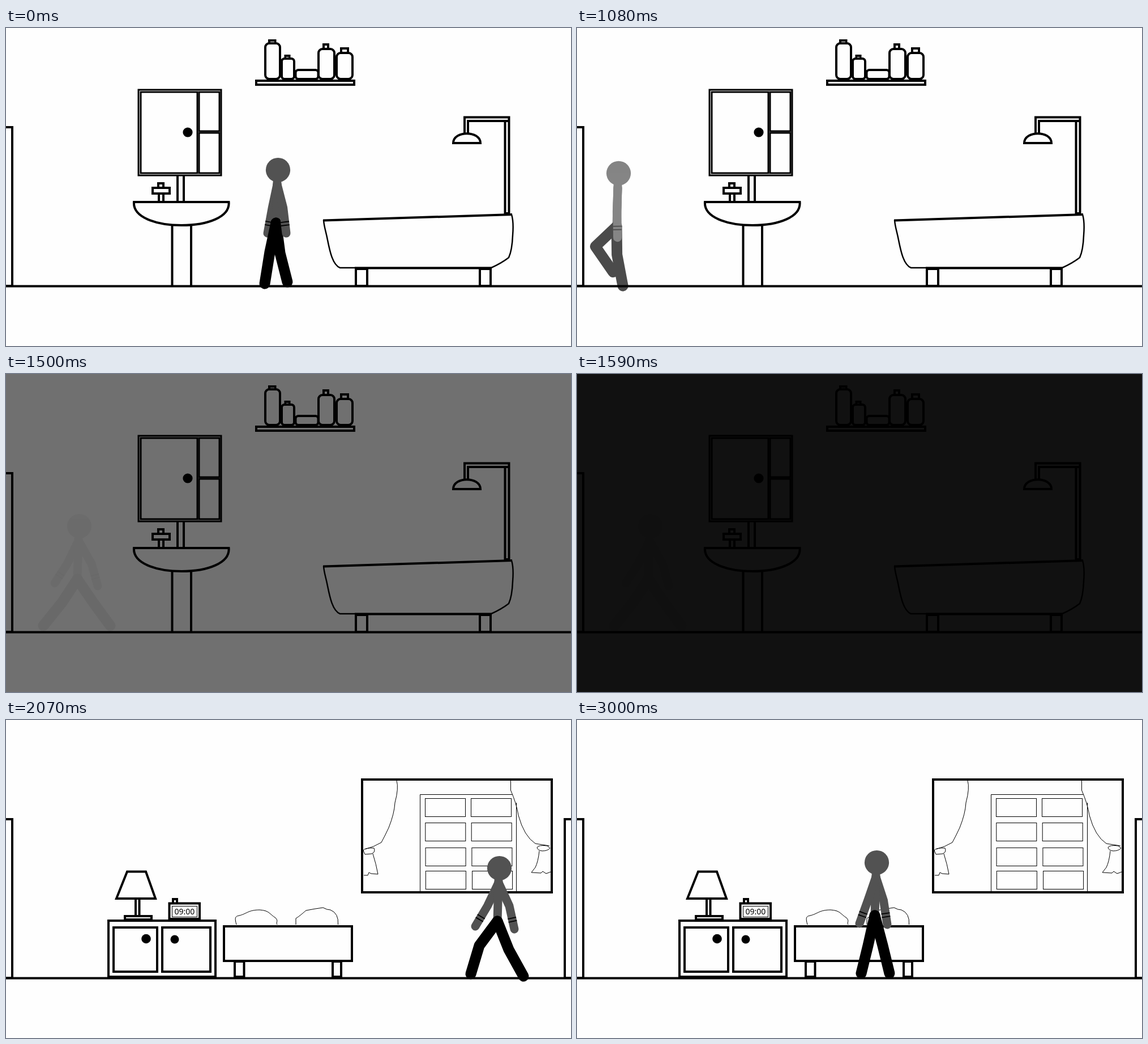
An HTML page for the animation above (3300 ms loop, 998x561 px).

```html
<!DOCTYPE html>
<html lang="en">
<head>
<meta charset="utf-8">
<title>Bedtime walk</title>
<style>
html, body { margin: 0; width: 100%; height: 100%; overflow: hidden; background: #fefefe; }
svg { display: block; width: 998px; height: 561px; }
.line { fill: none; stroke: #000; stroke-width: 4; }
.mid { stroke-width: 3; }
.thin { stroke-width: 1; }
.dot { fill: #000; stroke: none; }
#walker { fill: none; stroke-linecap: round; stroke-linejoin: round; }
.skin { stroke: #525252; stroke-width: 15; }
.leg { stroke: #000; stroke-width: 19; }
.band { stroke: #000; stroke-width: 1.8; stroke-linecap: butt; }
text { font: 14px "Noto Sans", "Open Sans", sans-serif; text-anchor: middle; }
</style>
</head>
<body>
<svg viewBox="0 0 998 561">
  <path class="line" d="M0 455.5H998"/>

  <g id="bathroom" class="line">
    <g class="mid">
      <rect x="234" y="109" width="146" height="151"/>
      <rect x="238" y="113" width="100" height="143"/>
      <rect x="341" y="113" width="36" height="69"/>
      <rect x="341" y="185" width="36" height="71"/>
    </g>
    <circle class="dot" cx="321" cy="184" r="8.6"/>
    <path d="M303 260V307M314 260V307"/>
    <path d="M259 282H289V292H259ZM269 282V274H278V282M270 292V307M278 292V307"/>
    <path d="M226 307H393.500C396 334 355 348 310 348S224 334 226 307Z"/>
    <path d="M293.500 348V455M327 348V455"/>

    <rect x="442" y="93" width="173" height="7"/>
    <rect x="458" y="27" width="26" height="63" rx="7"/>
    <rect x="465" y="22" width="10.500" height="5"/>
    <rect x="487" y="54" width="22" height="36" rx="5"/>
    <rect x="493.500" y="49" width="7" height="5"/>
    <rect x="511.500" y="74" width="40" height="16" rx="5"/>
    <rect x="552" y="37" width="28" height="53" rx="7"/>
    <rect x="561" y="29" width="8" height="8"/>
    <rect x="584" y="44" width="28" height="46" rx="7"/>
    <rect x="592" y="36" width="12" height="8"/>

    <path d="M881.500 164V327H888.500V157.500H810V185M816 185V164H889"/>
    <path d="M790 203C790 180.500 838 180.500 838 203Z"/>

    <path d="M560 339.500L894 329M616 423.500H858"/>
    <path stroke-width="2.500" d="M561 339C562 352 565 358 568 374C572 394 577 418 590 423H857Q875 415 888 405Q894 392 895 366Q897 342 893 329"/>
    <path d="M618 425H638V455H618ZM837 425H856V455H837Z"/>
  </g>

  <g id="bedroom" class="line">
    <rect x="181" y="354" width="189" height="99"/>
    <rect x="190" y="366" width="77" height="78"/>
    <rect x="276" y="366" width="85" height="78"/>
    <circle class="dot" cx="247.500" cy="386" r="8.300"/>
    <circle class="dot" cx="298" cy="387" r="7.500"/>
    <path d="M214 267.500H247L264 315H195ZM229 316V345M235.500 316V345M210 346H257V352H210Z"/>
    <path d="M288.500 323.500H342V351H288.500ZM295 323V316H302V323"/>
    <rect class="thin" x="293.500" y="328.500" width="44" height="19"/>
    <text x="315.500" y="343" fill="#000" stroke="none">09:00</text>

    <rect x="385" y="364" width="226" height="61"/>
    <path d="M404 426H420.500V453H404ZM577 426H592V453H577Z"/>
    <g class="thin">
      <path d="M407 361C404 350 404 346 412 345C425 342 428 335 448 335C465 336 465 342 476 349C482 355 476 357 479 361"/>
      <path d="M512 361V350C520 345 525 340 530 336Q545 333 560 331Q567 335 573 335Q588 341 586.500 361"/>
      <path d="M731.500 302V131.500H895M901.500 146V302"/>
      <g id="panes"></g>
      <path d="M690 107Q694 120 687 146Q686 165 676 190Q670 203 663 216Q650 224 634 228"/>
      <path d="M631 230Q634 225 650 226Q653 233 646 236L634 237ZM648 236Q654 255 657 272L645 271L641 269L639 274H632"/>
      <path d="M891.500 107V124Q902 148 905 168Q915 205 935 218L960 222"/>
      <path d="M938 225Q940 220 956 222L961 226Q957 231 947 231Q939 230 938 225ZM942 231Q940 250 935 260L928 269L945 270L948 267L954 271L962 268"/>
    </g>
    <rect x="629" y="105" width="335" height="199"/>
  </g>

  <g id="walker">
    <path class="skin"/><path class="band"/>
    <path class="skin"/>
    <path class="leg"/><path class="leg"/>
    <path class="skin"/><path class="band"/>
    <circle r="21.600" fill="#525252"/>
  </g>

  <g class="line" style="fill:#fefefe">
    <path d="M-5 175H11V455H-5"/>
    <path id="exit" d="M1003 175H987V455H1003"/>
  </g>
  <rect id="shade" width="998" height="561"/>
</svg>
<script>
const $ = id => document.getElementById(id);
const clamp = v => Math.max(0, Math.min(1, v));
const mix = (a, b, k) => a.map((v, i) => v + (b[i] - v) * k);
const parts = $('walker').children;

$('panes').innerHTML = [139, 182, 226, 267].map((y, i) =>
  [740.5, 821.5].map((x, j) =>
    `<rect x="${x + (j ? i * .7 : i * .3)}" y="${y - .5}" width="71" height="32"/>`).join('')).join('');

// Pose: hip height, then knee, foot, knee, foot, hand, hand relative to the hip
const contact = [355, -32, 43, -47, 93, 20, 50, 46, 97, -39, 9, 30, 14];
const rest = [345, -12, 53, -24, 102, 14, 53, 26, 102, -27, 14, 22, 16];
const wide = [362, -27, 41, -60, 82, 28, 41, 58, 82, -40, 7, 36, 12];
const swap = p => [p[0], ...p.slice(5, 9), ...p.slice(1, 5), p[11], p[12], p[9], p[10]];
const step = [
  [0, contact],
  [.28, [344, -11, 51, -20, 107, 7, 53, 20, 104, -15, 18, 18, 18]],
  [.6, [350, 1, 50, 12, 105, -39, 35, -7, 80, 2, 20, 0, 20]],
  [.93, [356, 17, 49, 42, 98, -38, 38, -43, 93, 15, 20, -20, 16]],
  [1, swap(contact)]
];

function stride(phase, settle = 0) {
  const n = Math.floor(phase), f = phase - n;
  const i = step.findIndex(s => s[0] > f);
  const [a, from] = step[i - 1], [b, to] = step[i];
  const pose = mix(mix(from, to, (f - a) / (b - a)), rest, settle);
  return n % 2 ? swap(pose) : pose;
}

function drawWalker(x, pose, alpha) {
  const [y, ...q] = pose;
  const line = (...pts) => 'M' + pts.map(([u, v]) => `${x + u} ${y + v}`).join('L');
  const set = (i, d) => parts[i].setAttribute('d', d);
  const arm = (i, hx, hy) => {
    const ex = hx * (hx < 0 ? .45 : .7), ey = -27;
    const len = Math.hypot(hx - ex, hy - ey);
    const dx = (hx - ex) / len, dy = (hy - ey) / len;
    set(i, line([2, -68], [ex, ey], [hx, hy]));
    set(i + 1, [14, 20].map(r => {
      const bx = hx - dx * r, by = hy - dy * r;
      return line([bx - dy * 7.5, by + dx * 7.5], [bx + dy * 7.5, by - dx * 7.5]);
    }).join(''));
  };
  arm(0, q[8], q[9]);
  set(2, line([2, -72], [0, 0]));
  set(3, line([0, 0], [q[0], q[1]], [q[2], q[3]]));
  set(4, line([0, 0], [q[4], q[5]], [q[6], q[7]]));
  arm(5, q[10], q[11]);
  parts[7].setAttribute('cx', x + 3.5);
  parts[7].setAttribute('cy', y - 93.5);
  $('walker').setAttribute('opacity', alpha);
}

function draw(t) {
  const inBath = t < 1605;
  $('bathroom').style.display = inBath ? '' : 'none';
  $('bedroom').style.display = $('exit').style.display = inBath ? 'none' : '';
  const light = inBath ? 1 - (t - 1366) / 240 : (t - 1591) / 240;
  $('shade').setAttribute('opacity', 1 - clamp(light));

  if (!inBath) {
    const x = 868 - (t - 2070) * 342 / 930;
    drawWalker(x, stride((t - 2070) / 283 + 4, clamp((t - 2820) / 180)), clamp((t - 1698) / 270));
  } else if (t < 1365) {
    const x = t < 540 ? 477 - t * 188 / 540 : 289 - (t - 540) * 219 / 540;
    drawWalker(x, stride(.28 + t * 1.655 / 540), clamp(1 - (t - 960) / 400));
  } else {
    drawWalker(126, wide, .06);
  }
}

const start = performance.now();
function tick() {
  const t = (performance.now() - start) % 3300;
  draw(Math.min(3000, Math.floor(t / 30) * 30));
  requestAnimationFrame(tick);
}
tick();
</script>
</body>
</html>
```
